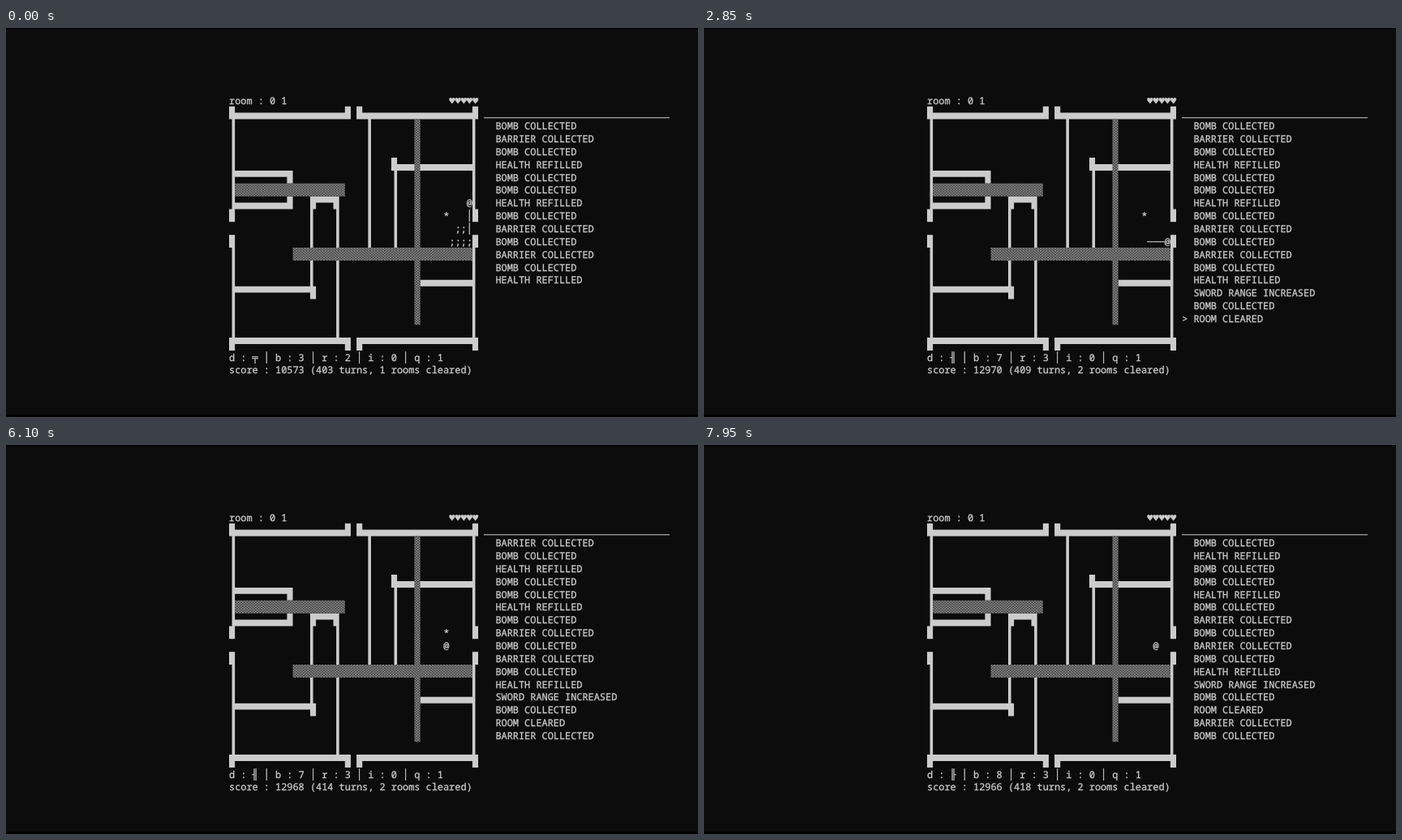
An HTML page that plays this animation: 853 px wide and 480 px high, repeating every 8000 ms.

```html
<!DOCTYPE html>
<html lang="en">
<head>
<meta charset="utf-8">
<title>Dungeon room</title>
<style>
  html, body { margin: 0; width: 100%; height: 100%; overflow: hidden; background: #000; }
  svg { display: block; width: 853px; height: 480px; }
  text {
    font: 11.9px "Noto Sans Mono", "DejaVu Sans Mono", monospace;
    fill: #ccc; stroke: #ccc; stroke-width: .3px;
    white-space: pre; text-rendering: geometricPrecision;
  }
</style>
</head>
<body>
<svg viewBox="0 0 853 480">
  <defs>
    <pattern id="shade" x="275" y="80.8" width="3.57" height="3.1714" patternUnits="userSpaceOnUse">
      <path d="M0 0h4v4h-4z" fill="#454545"/>
      <path d="M0 0h1.785v1.5857h-1.785zM1.785 1.5857h1.785v1.5857h-1.785z" fill="#858585"/>
    </pattern>
  </defs>
  <rect y="1" width="853" height="476" fill="#0c0c0c"/>
  <g id="room"></g>
  <g id="live"></g>
</svg>
<script>
// Terminal grid: cell size and top left corner
const CW = 7.14, CH = 15.857, X0 = 275, Y0 = 80.8;
const LOOP = 8000;

const outline = (c, r, w = 1, h = 1) =>
  `M${X0 + c * CW} ${Y0 + r * CH}h${w * CW}v${h * CH}h${-w * CW}z`;
const path = (d, fill) => `<path d="${d}" fill="${fill}"/>`;
const text = (c, r, s) =>
  `<text x="${X0 + c * CW}" y="${Y0 + r * CH + 12.7}">${s.replace('>', '&gt;')}</text>`;
const cell = (c, r, ch) => path(outline(c, r), '#0c0c0c') + text(c, r, ch);

function drawRoom() {
  let walls = '';
  const add = (...a) => walls += outline(...a);

  // Outer walls with a door in each side
  for (const c of [0, 20, 22, 42]) { add(c, 1); add(c, 19); }
  for (const c of [0, 42]) { add(c, 9); add(c, 11); }
  for (const c of [1, 23]) { add(c, 1.5, 19, .5); add(c, 19, 19, .5); }
  for (const r of [2, 12]) { add(.5, r, .5, 7); add(42, r, .5, 7); }

  // Inner walls: column, row, width, height
  [
    [1, 6, 9, .5], [10, 6, 1, 1],
    [1, 8.5, 9, .5], [10, 8, 1, 1],
    [14, 8, 1, 1], [15, 8, 3, .5], [18, 8, 1, 1],
    [14, 9, .5, 6], [14, 15, 1, 1], [1, 15, 13, .5],
    [18.5, 9, .5, 10], [24, 2, .5, 10],
    [28, 5, 1, 1], [28.5, 6, .5, 6], [29, 5.5, 13, .5],
    [33, 14.5, 9, .5]
  ].forEach(w => add(...w));

  const shaded = outline(1, 7, 19, 1) + outline(11, 12, 31, 1) + outline(32, 2, 1, 16);

  document.getElementById('room').innerHTML =
    path(walls, '#ccc') + path(shaded, 'url(#shade)') +
    text(0, 0, 'room : 0 1') + text(38, 0, '♥♥♥♥♥') +
    path('M589 110.3h229v1h-229z', '#ccc');
}

const MESSAGES = {
  B: 'BOMB COLLECTED', R: 'BARRIER COLLECTED', H: 'HEALTH REFILLED',
  S: 'SWORD RANGE INCREASED', C: 'ROOM CLEARED'
};
const LOG = 'BRBHBBHBRBRBHSBCRB';

// Each step lists only what differs from the one before
const steps = [];
const step = (t, change) => steps.push({ ...steps.at(-1), ...change, t });

step(0, {
  x: 41, y: 8, dir: '╤', sword: 2, bombs: 3, range: 2, turn: 403, score: 10573,
  rooms: 1, log: 13, mark: false, things: ['*', '  ;;', ' ;;;;']
});
step(50, { y: 9, sword: 0, range: 3, turn: 404, score: 10848, log: 14, mark: true });
step(650, { y: 10, bombs: 4, turn: 405, score: 10847, log: 15 });
step(1000, { sword: 3, turn: 406, mark: false });
step(1050, { score: 10897, things: ['*', '  ::', ' :::'] });
step(1350, { dir: '╢', sword: 0 });
step(1500, { sword: 3, turn: 407, score: 10896, things: ['*', '', ' :::'] });
step(1900, { dir: '╤', sword: 0 });
step(2150, { y: 11, turn: 408 });
step(2500, { dir: '╢' });
step(2750, {
  sword: 3, turn: 409, score: 12970, bombs: 7, rooms: 2, log: 16, mark: true,
  things: ['*', '', '  $']
});
step(3250, { x: 40, sword: 0, turn: 410, mark: false });
step(3950, { x: 39, turn: 411, score: 12969, log: 17, mark: true, things: ['*', '', ''] });
step(4600, { dir: '╧', mark: false });
step(5200, { y: 10, turn: 412 });
step(5450, { dir: '╢' });
step(5650, { x: 38, turn: 413, score: 12968 });
step(6100, { x: 37, turn: 414 });
step(6350, { dir: '╧' });
step(6500, { y: 9, turn: 415, score: 12967, bombs: 8, log: 18, mark: true, things: ['', '', ''] });
step(7050, { dir: '╤', mark: false });
step(7400, { y: 10, turn: 416 });
step(7650, { dir: '╟' });
step(7750, { x: 38, turn: 417, score: 12966 });
step(7900, { x: 39, turn: 418 });

const live = document.getElementById('live');

function drawState(s) {
  const out = s.things.map((line, i) => text(37, 9 + i, line));

  for (let i = 1; i <= s.sword; i++)
    out.push(s.dir === '╤' ? cell(s.x, s.y + i, '│') : cell(s.x - i, s.y, '─'));
  out.push(cell(s.x, s.y, '@'));

  const shown = [...LOG.slice(0, s.log)].slice(-16);
  shown.forEach((k, i) => out.push(text(46, 2 + i, MESSAGES[k])));
  if (s.mark) out.push(text(44, 1 + shown.length, '>'));

  out.push(
    text(0, 20, `d : ${s.dir} │ b : ${s.bombs} │ r : ${s.range} │ i : 0 │ q : 1`),
    text(0, 21, `score : ${s.score} (${s.turn} turns, ${s.rooms} rooms cleared)`)
  );
  live.innerHTML = out.join('');
}

let current;
function frame() {
  const t = performance.now() % LOOP;
  const s = steps.findLast(e => e.t <= t);
  if (s !== current) drawState(current = s);
  requestAnimationFrame(frame);
}

drawRoom();
frame();
</script>
</body>
</html>
```
